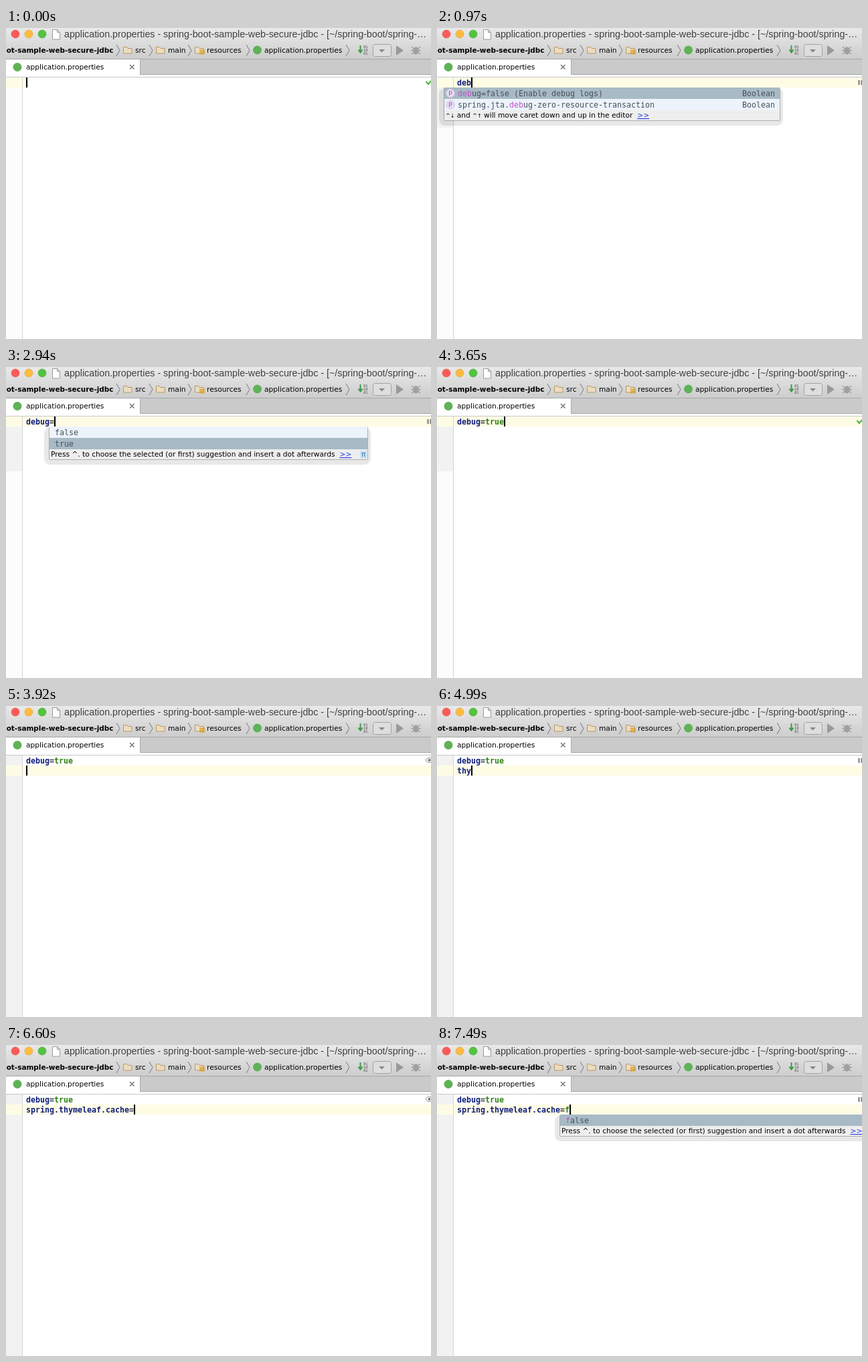
Write an HTML page that moves like this. It is 635 px wide and 465 px high and loops after 8 s.

```html
<!DOCTYPE html>
<html lang="en">
<head>
<meta charset="utf-8">
<title>Property completion</title>
<style>
html, body { margin: 0; width: 100%; height: 100%; overflow: hidden; background: #fff; }
svg { display: block; }
text { white-space: pre; font: 10.65px "DejaVu Sans", sans-serif; fill: #000; }
.title { font: 14.25px "Liberation Sans", sans-serif; fill: #404040; }
.project { font-weight: bold; font-size: 10.45px; text-anchor: end; }
.bits { font: bold 5.5px "DejaVu Sans Mono", monospace; fill: #777; }
.code, .row { font: 11.63px "DejaVu Sans Mono", monospace; }
.code { font-weight: bold; fill: #333; }
.key { fill: #10207c; }
.value { fill: #2f8212; }
.row { fill: #48505a; }
.match { fill: #c44fc8; }
.default { fill: #4a9c58; }
.note { fill: #b6bbc0; }
.on .default, .on .note { fill: #48505a; }
.type { text-anchor: end; }
.badge { font-size: 9px; fill: #8560a8; text-anchor: middle; }
.keys { font-size: 8px; }
.link { fill: #2038e0; text-decoration: underline; }
</style>
</head>
<body>
<svg width="635" height="465" viewBox="0 0 635 465">
  <defs>
    <linearGradient id="bar" x2="0" y2="1">
      <stop stop-color="#e9e9e9"/><stop offset="1" stop-color="#cdcdcd"/>
    </linearGradient>
    <path id="folder" d="M.5 2.5h5l1.500 2h6v7.500h-12.500z" fill="#ecdcc0" stroke="#b99763"/>
    <path id="chevron" d="M0 25l5 8.500l-5 8.500" fill="none" stroke="#777"/>
  </defs>

  <rect width="635" height="47" fill="url(#bar)"/>
  <g stroke-width=".6">
    <circle cx="14" cy="9" r="6" fill="#fc5b57" stroke="#df4744"/>
    <circle cx="34" cy="9" r="6" fill="#fdbc40" stroke="#de9f34"/>
    <circle cx="54" cy="9" r="6" fill="#53c43f" stroke="#3fa52e"/>
  </g>
  <path d="M69.500 2.500h7l4 4v10.500h-11zM76.500 2.500v4h4" fill="#fff" stroke="#999"/>
  <text class="title" x="87" y="14">application.properties - spring-boot-sample-web-secure-jdbc - [~/spring-boot/spring-…</text>

  <text class="project" x="160.500" y="37">ot-sample-web-secure-jdbc</text>
  <use href="#chevron" x="165"/><use href="#chevron" x="214"/><use href="#chevron" x="272"/>
  <use href="#chevron" x="359"/><use href="#chevron" x="508"/>
  <use href="#folder" x="175" y="26"/><use href="#folder" x="224" y="26"/><use href="#folder" x="282" y="26"/>
  <path d="M289 33.500h8m-8 2.500h8m-8 2.500h8" stroke="#d99a1c" stroke-width="1.500"/>
  <text x="193" y="37">src</text>
  <text x="242" y="37">main</text>
  <text x="300" y="37">resources</text>
  <circle cx="375.500" cy="33" r="6.500" fill="#5fb257"/>
  <text x="386" y="37">application.properties</text>

  <path d="M529.500 26v10m-3-3.500l3 4l3-4" fill="none" stroke="#3c9a45" stroke-width="2"/>
  <text class="bits" x="534" y="30">01</text>
  <text class="bits" x="534" y="35">10</text>
  <text class="bits" x="534" y="40">01</text>
  <rect x="548.500" y="24.500" width="27" height="18" rx="3" fill="#dedede" stroke="#a2a2a2"/>
  <path d="M557 32h9l-4.500 4.500z" fill="#888"/>
  <path d="M583 26v15l11-7.500z" fill="#999"/>
  <g fill="none" stroke="#a0a0a0" stroke-width="1.500">
    <path d="M606 28l13 11m-13 0l13-11m-14 5.500h15"/>
    <ellipse cx="612.500" cy="34" rx="3.500" ry="5" fill="#a0a0a0"/>
  </g>

  <path d="M0 46h635v24h-635z" fill="#cacaca"/>
  <path d="M0 46.500h635M200.500 47v22.500h435" fill="none" stroke="#a8a8a8"/>
  <path d="M0 47h200v23h435v4h-635z" fill="#fff"/>
  <circle cx="17" cy="58.500" r="6.500" fill="#5fb257"/>
  <text x="30" y="62">application.properties</text>
  <path d="M185 55l6.500 6.500m0-6.500l-6.500 6.500" stroke="#777" stroke-width="1.500"/>
  <path d="M0 73.500h635" stroke="#c8c8c8"/>

  <g id="editor"></g>
</svg>
<script>
const editor = document.getElementById('editor');
const LOOP = 8000, CHAR = 7, LINE = 15, ROW = 16.75, HINT = 15, LEFT = 30, TOP = 74;

// Timelines: [start in ms, value]
const typed = [[0, ''], [530, 'd'], [710, 'de'], [890, 'deb'], [1330, 'debug='], [3200, 'debug=true'],
  [3830, 'debug=true\n'], [4720, 'debug=true\nt'], [4900, 'debug=true\nth'], [4990, 'debug=true\nthy'],
  [6510, 'debug=true\nspring.thymeleaf.cache='], [7310, 'debug=true\nspring.thymeleaf.cache=f']];
const caretOn = [[0, 1], [80, 0], [530, 1], [2490, 0], [2940, 1], [4540, 0], [4720, 1], [5530, 0], [5800, 1]];
const status = [[0, 'check'], [530, 'pause'], [1410, 'eye'], [1860, 'check'], [1950, 'pause'], [3290, 'eye'],
  [3650, 'check'], [3920, 'eye'], [4270, 'check'], [4720, 'pause'], [6600, 'eye'], [7050, 'check'], [7310, 'pause']];
const popups = [[0, ''], [800, 'de'], [970, 'deb'], [1330, ''], [1950, 'bool'], [3200, ''],
  [5170, 'thy'], [6510, ''], [7490, 'f']];
const selection = [[0, 0], [2940, 1], [3200, 0], [5800, 2], [5890, 4], [5970, 2], [6060, 0]];
const gutter = [[0, 0], [800, 75], [1330, 82], [3830, 391]];

const moveHint = '<tspan class="keys">^↓</tspan> and <tspan class="keys">^↑</tspan> will move caret down and up in the editor';
const dotHint = 'Press ^. to choose the selected (or first) suggestion and insert a dot afterwards';

// Rows: name | default | note | type
const debugRow = 'debug|=false| (Enable debug logs)|Boolean';
const jtaRow = 'spring.jta.debug-zero-resource-transaction|||Boolean';
const lists = {
  de: { x: 11, w: 501, match: 'de', hint: moveHint, rows: [debugRow, jtaRow,
    'spring.mail.default-encoding|="UTF-8"| (Default MimeM…|String',
    'spring.jackson.deserialization|| (Jackson on/off…|Map',
    'security.headers.cache|=true| (Enable cache control…|Boolean',
    'spring.jta.default-transaction-timeout|||int',
    'server.tomcat.protocol-header|| (Header that hold…|String'] },
  deb: { x: 11, w: 501, match: 'deb', hint: moveHint, rows: [debugRow, jtaRow] },
  bool: { x: 65, w: 475, hint: dotHint, rows: ['false', 'true'] },
  f: { x: 184, w: 475, match: 'f', hint: dotHint, rows: ['false'] },
  thy: { x: 11, w: 501, match: 'thy', hint: dotHint, rows: [
    'cache|=true| (Enable template caching)|Boolean',
    'check-template-location|=true| (Check that…|Boolean',
    'content-type|="text/html"| (Content-Type va…|String',
    'enabled|=true| (Enable MVC Thymeleaf view …|Boolean',
    'encoding|="UTF-8"| (Template encoding)|String',
    'excluded-view-names|| (Comma-separated li…|String[]',
    'mode|="HTML5"| (Template mode to be applied…|String'].map(r => 'spring.thymeleaf.' + r) }
};

const icons = {
  check: '<path d="M627.500 80l3.500 4l6-7" fill="none" stroke="#4caf3e" stroke-width="2"/>',
  pause: '<path d="M630.500 78v7m4-7v7" stroke="#777" stroke-width="2"/>',
  eye: '<ellipse cx="632.500" cy="81" rx="5" ry="3.500" fill="#fff" stroke="#888"/><circle cx="632.500" cy="81" r="2" fill="#777"/>'
};

const at = (list, t) => list.findLast(([start]) => start <= t)[1];
const rect = (x, y, w, h, fill, extra = '') =>
  `<rect x="${x}" y="${y}" width="${w}" height="${h}" fill="${fill}" ${extra}/>`;
const text = (x, y, cls, body) => `<text x="${x}" y="${y}" class="${cls}">${body}</text>`;
const span = (cls, body) => `<tspan class="${cls}">${body}</tspan>`;

function codeLine(line, i) {
  const [key, value] = line.split('=');
  const tail = value === undefined ? '' : '=' + span('value', value);
  return text(LEFT, TOP + 12 + i * LINE, 'code', span('key', key) + tail);
}

function popupRow(row, y, selected, { x, w, match }) {
  const [name, value = '', note = '', type] = row.split('|');
  const label = match ? name.replace(match, span('match', match)) : name;
  const body = label + span('default', value) + span('note', note);
  const cls = selected ? 'row on' : 'row';
  let out = selected ? rect(x, y, w, Math.ceil(ROW), '#a7bac5') : '';
  if (type) {
    out += `<circle cx="${x + 9}" cy="${y + 8.5}" r="6.500" fill="#e6daf1" stroke="#c9b4dc" stroke-width=".6"/>`
      + text(x + 9, y + 12, 'badge', 'P') + text(x + w - 7, y + 13, cls + ' type', type);
  }
  return out + text(x + (type ? 20 : 8), y + 13, cls, body);
}

function popup(list, y, selected) {
  const { x, w, rows, hint } = list;
  const bodyH = Math.min(Math.round(rows.length * ROW), 111), h = bodyH + HINT;
  let out = rect(x - 8, y + 1, w + 13, h + 7, '#000', 'rx="9" opacity=".09"')
    + rect(x - 1, y, w + 2, h + 1, '#000', 'rx="2" opacity=".25"')
    + rect(x, y, w, h, '#ecf3fb')
    + rows.map((row, i) => popupRow(row, Math.round(y + i * ROW), i === selected, list)).join('');
  if (rows.length > 6) out += rect(x + w - 7, y + 17, 6, 53, '#b8ccdc', 'opacity=".45"');
  out += rect(x, y + bodyH, w, HINT, '#eee')
    + text(x + 2, y + bodyH + 11, '', hint + '<tspan dx="7" class="link">&gt;&gt;</tspan>');
  if (hint === dotHint) {
    out += rect(x + w - 11, y + bodyH + 2, 10, 12, '#cfe2f2')
      + text(x + w - 9, y + bodyH + 11, '', '<tspan fill="#3a78b0">π</tspan>');
  }
  return out;
}

function draw(t) {
  const lines = at(typed, t).split('\n'), last = lines.length - 1;
  const y = TOP + last * LINE, list = lists[at(popups, t)];
  let out = rect(0, TOP, 24, 391, '#fcfcfc') + rect(0, TOP, 24, at(gutter, t), '#f2f2f2')
    + rect(0, y, t < 530 ? LEFT : 635, LINE, '#fffce6')
    + rect(24, TOP, 1, 391, '#d4d4d4') + lines.map(codeLine).join('') + icons[at(status, t)];
  if (at(caretOn, t)) out += rect(LEFT + lines[last].length * CHAR, y, 2, LINE, '#000');
  if (list) out += popup(list, y + LINE, at(selection, t));
  return out;
}

let shown;
function tick() {
  const next = draw(performance.now() % LOOP);
  if (next !== shown) editor.innerHTML = shown = next;
  requestAnimationFrame(tick);
}
tick();
</script>
</body>
</html>
```
